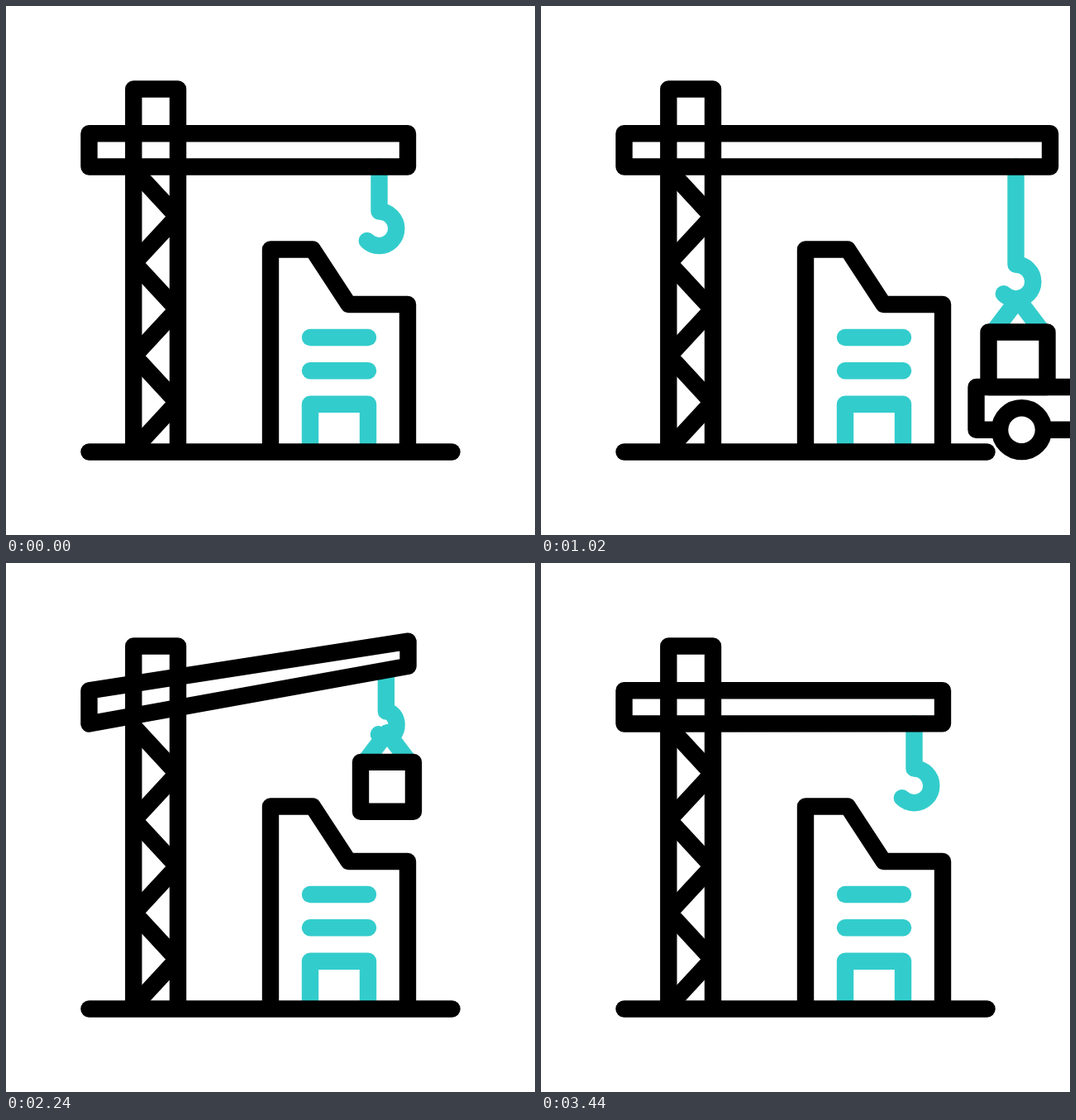
An HTML page with a canvas for the animation above (3.6 s loop, 640 by 640 pixels).

```html
<!DOCTYPE html>
<html lang="en">
<head>
<meta charset="utf-8">
<title>Tower crane</title>
<style>
  html, body { margin: 0; width: 100%; height: 100%; overflow: hidden; background: #fff; }
  canvas { display: block; width: 640px; height: 640px; }
</style>
</head>
<body>
<canvas id="stage" width="640" height="640"></canvas>
<script>
const ctx = document.getElementById('stage').getContext('2d');
const LOOP = 3600, STEP = 20, BEAT = 600;
const RETURN = 2920, RETURN_END = 3450;
const INK = '#000', TEAL = '#33cccc', PAPER = '#fff';
const GROUND = 539.5, FOOT = GROUND - 3;
const JIB_LEFT = 100.5, JIB_TOP = 154.3, JIB_BOTTOM = 194.5;

// Eased progress, 0 to 1, of a move between two times
function progress(t, from, to = from + BEAT) {
  const u = Math.min(1, Math.max(0, (t - from) / (to - from)));
  return u * u * (3 - 2 * u);
}

function paint(color, fill) {
  if (fill) {
    ctx.fillStyle = fill;
    ctx.fill();
  }
  ctx.strokeStyle = color;
  ctx.stroke();
}

function line(points, color = INK, fill) {
  ctx.beginPath();
  points.forEach(([x, y]) => ctx.lineTo(x, y));
  paint(color, fill);
}

function loop(points) {
  ctx.beginPath();
  points.forEach(([x, y]) => ctx.lineTo(x, y));
  ctx.closePath();
  paint(INK);
}

// An arch standing on the ground
function arch(left, right, top, color) {
  line([[left, FOOT], [left, top], [right, top], [right, FOOT]], color);
}

function drawHook(x, y, jib, turn) {
  const slope = (jib.bottom - JIB_BOTTOM) / (jib.x - JIB_LEFT);
  const rx = 20.8 - 9.8 * turn, ry = 20.8 - 5.6 * turn;
  ctx.beginPath();
  ctx.moveTo(x, JIB_BOTTOM + slope * (x - JIB_LEFT) + 11 * turn);
  ctx.lineTo(x, y);
  ctx.ellipse(x, y + ry, rx, ry, 0, -Math.PI / 2, Math.PI * 0.75);
  paint(TEAL);
}

function drawCrate(x, y, scale) {
  const at = (dx, dy) => [x + dx * scale, y + dy * scale];
  const half = 35.5, top = 39.5, bottom = 106;
  line([at(-30, top), at(0, 0), at(30, top)], TEAL);
  loop([at(-half, top), at(half, top), at(half, bottom), at(-half, bottom)]);
}

function drawTruck(x) {
  const bed = 461, axle = 512.7, beyond = 800;
  line([[beyond, bed], [x, bed], [x, axle], [beyond, axle]]);
  ctx.beginPath();
  ctx.arc(x + 55, axle, 26.4, 0, Math.PI * 2);
  paint(INK, PAPER);
}

function drawBuilding() {
  line([[320, FOOT], [320, 294.5], [371, 294.5], [414.5, 361], [486, 361], [486, FOOT]], INK, PAPER);
  for (const y of [401, 441.3]) line([[368, y], [438, y]], TEAL);
  arch(368, 438, 481.7, TEAL);
}

function drawTower() {
  arch(154.3, 208, 100.5, INK);
  line(Array.from({ length: 7 }, (_, i) => [i % 2 ? 207 : 155, 198.5 + i * 56.2]));
}

function draw(t) {
  const [extend, dip, lift, swing] = [0, 1, 2, 3].map(i => progress(t, i * BEAT));
  const sink = progress(t, 4 * BEAT, RETURN);
  const back = progress(t, RETURN, RETURN_END);
  const turn = swing - back;
  const away = 130 * (1 - extend);

  const jib = {
    x: 486 + 130 * extend - 157 * swing + 27 * back,
    top: JIB_TOP - 72.3 * turn,
    bottom: JIB_BOTTOM - 84.5 * turn
  };
  const hookX = 451.5 + 123 * extend - 139 * swing + 16 * back;
  const hookY = 248.5 + 82 * (dip - lift) - 83.5 * turn + 228 * (sink - back);

  ctx.fillStyle = PAPER;
  ctx.fillRect(0, 0, 640, 640);
  ctx.lineWidth = 20.4;
  ctx.lineCap = ctx.lineJoin = 'round';

  drawHook(hookX, hookY, jib, turn);
  if (t < RETURN) {
    drawCrate(577 + away - 140.7 * swing, 355 - 74 * lift - 91.8 * swing + 228 * sink, 1 - 0.12 * swing);
  }
  drawBuilding();
  drawTower();
  loop([[JIB_LEFT, JIB_TOP], [jib.x, jib.top], [jib.x, jib.bottom], [JIB_LEFT, JIB_BOTTOM]]);
  line([[JIB_LEFT, GROUND], [539.5, GROUND]]);
  drawTruck(526.5 + away + 130 * lift);
}

const start = performance.now();
function frame() {
  const t = (performance.now() - start) % LOOP;
  draw(Math.floor(t / STEP) * STEP);
  requestAnimationFrame(frame);
}
frame();
</script>
</body>
</html>
```
